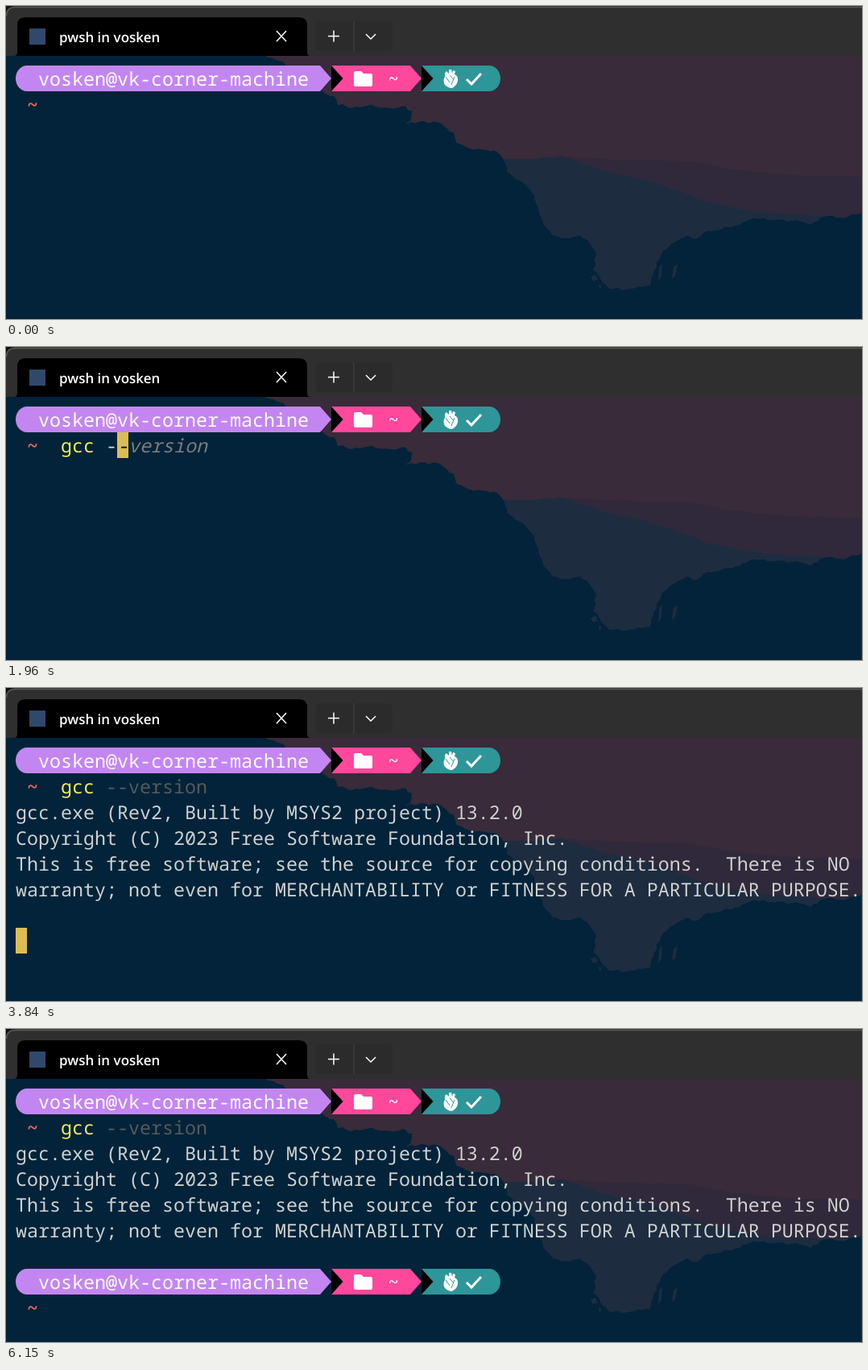
Animation of 1063 by 389 pixels, one loop 6.3 s. Source, as an HTML page:

```html
<!DOCTYPE html>
<html lang="en">
<head>
<meta charset="utf-8">
<title>Terminal</title>
<style>
  html, body { margin: 0; width: 100%; height: 100%; overflow: hidden; background: #02233a; }
  svg { display: block; width: 1063px; height: 389px; }
  text {
    font: 23.3333px "Noto Sans Mono", "DejaVu Sans Mono", monospace;
    white-space: pre;
    text-rendering: geometricPrecision;
    font-variant-ligatures: none;
  }
  .title { font: 600 17px "Open Sans", "Noto Sans", sans-serif; fill: #fff; }
  .line { fill: none; stroke: #fff; stroke-width: 1.5; }
  .out { fill: #cdd1cd; }
  .ghost { font-style: italic; fill: #7b7d7a; }
  .under { font-style: italic; fill: #14181c; }
  .cmd { fill: #f5ec4c; }
  .tilde { fill: #ec6a61; font-weight: 600; }
</style>
</head>
<body>
<svg viewBox="0 0 1063 389" xmlns="http://www.w3.org/2000/svg">
  <defs>
    <g id="prompt">
      <path fill="#c386f1" d="M26 74H390L404 90L390 106H26A14 16 0 0 1 26 74Z"/>
      <path fill="#ff479c" d="M404 74H502L516 90L502 106H404Z"/>
      <path fill="#2e9599" d="M516 74H600A14 16 0 0 1 600 106H516Z"/>
      <path d="M404 74L418.500 90L404 106ZM516 74L530.500 90L516 106Z"/>
      <g fill="#fff">
        <text x="40" y="99">vosken@vk-corner-machine</text>
        <text x="474" y="99" font-weight="600">~</text>
        <path d="M434 81H441L444 84H453Q455 84 455 86V98Q455 100 453 100H434Q432 100 432 98V83Q432 81 434 81Z"/>
        <path d="M545 88Q542 93 545 98Q549 102 554 102Q560 99 561 93Q562 87 557 85L558 81L555 80L554 84L553 79L550 79L550 84L547 81L545 83Z"/>
      </g>
      <path d="M546 88L551 95M551 86L556 92M557 88L553 98" fill="none" stroke="#2e9599"/>
      <path d="M572 91L578 97L590 84" fill="none" stroke="#fff" stroke-width="3"/>
      <text class="tilde" x="26" y="131">~</text>
    </g>
  </defs>

  <rect width="1063" height="389" fill="#02233a"/>
  <g id="scene"></g>

  <rect width="1063" height="62" fill="#2f2f2f"/>
  <path d="M0 0H12Q0 0 0 12Z" fill="#111"/>
  <path d="M.5 12Q.5 1.500 12 1.500H1063" fill="none" stroke="#575757" stroke-width="1.500"/>
  <path d="M10 62Q14 62 14 57V24Q14 14 24 14H364Q374 14 374 24V57Q374 62 378 62Z"/>
  <rect x="384" y="19" width="96" height="37" rx="6" fill="#2b2b2b"/>
  <path d="M432 19V56" stroke="#464646"/>
  <rect x="29" y="28" width="20" height="20" fill="#30486b"/>
  <text class="title" x="66" y="45">pwsh in vosken</text>
  <path class="line" d="M336 31L348 44M348 31L336 44M400 37.500H414M407 30.500V44.500M447 35L453 41L459 35"/>

  <use href="#prompt"/>
  <rect id="cursor" width="14" height="32" fill="#dcbd55"/>
  <text id="cmd" class="cmd" x="68" y="131"></text>
  <text id="opt" x="124" y="131"></text>
  <text id="under" class="under" y="131"></text>
  <text id="ghost" class="ghost" y="131"></text>
  <g id="output" class="out"></g>
  <use id="next" href="#prompt" y="224"/>
</svg>
<script>
const $ = id => document.getElementById(id);
const NS = "http://www.w3.org/2000/svg";
const CELL = 14, ROW = 32, LEFT = 12, TOP = 74, START = 68;
const LOOP = 6300, RUN = 3840, READY = 3900;

function add(parent, tag, attrs, text = "") {
  const el = document.createElementNS(NS, tag);
  for (const key in attrs) el.setAttribute(key, attrs[key]);
  el.textContent = text;
  parent.append(el);
}

// Landscape: a few ridge points, roughened by seeded noise
let seed = 7;
const noise = () => (seed = seed * 16807 % 2147483647) / 2147483647 - 0.5;

function ridge(points, rough) {
  const p = points.split(" ").map(s => s.split(",").map(Number));
  let d = "M" + p[0];
  for (let i = 1; i < p.length; i++) {
    const [ax, ay] = p[i - 1], [bx, by] = p[i];
    const n = Math.max(1, Math.round(Math.hypot(bx - ax, by - ay) / 5));
    for (let k = 1; k <= n; k++) {
      const x = ax + (bx - ax) * k / n + noise() * rough;
      const y = ay + (by - ay) * k / n + noise() * rough;
      d += `L${x.toFixed(1)} ${y.toFixed(1)}`;
    }
  }
  return d;
}

const layers = [
  ["#392b39", "M322 62H1063V300H620Z", 0],
  ["#30293b", "690,187 760,191 850,193 900,203 970,210 1063,212", 1, "V300H700Z"],
  ["#1e2c40", "612,190 650,190 690,187 720,197 750,207 790,215 830,228 870,243 910,252 960,258 1030,262 1063,262", 1, "V389H612Z"],
  ["#02233a", "322,62 340,68 354,78 372,90 393,107 406,113 413,122 430,127 455,124 475,127 492,124 504,131 " +
    "503,142 494,146 520,144 540,146 555,158 560,169 575,176 596,180 609,180 618,190 623,206 632,214 645,222 " +
    "655,235 662,255 668,273 680,285 700,290 712,284 725,295 732,310 730,328 737,338 748,351 775,352 799,347 " +
    "804,334 809,319 817,305 830,292 845,285 859,290 870,280 900,275 930,264 965,266 985,268 1000,272 1015,262 1040,263 1063,258",
    3, "V389H322Z"]
];
for (const [fill, shape, rough, close] of layers)
  add($("scene"), "path", { fill, d: close ? ridge(shape, rough) + close : shape });
add($("scene"), "path", {
  d: "M811 325L815 320L814 336L810 342ZM829 324L834 321L831 336L827 339ZM726 337L732 334L735 340L729 342ZM736 346L740 348L737 353Z",
  fill: "#1e2c40"
});
add($("scene"), "path", { d: "M474 150L488 139L501 136L502 143L489 149L484 154Z", fill: "#02233a" });

[
  "gcc.exe (Rev2, Built by MSYS2 project) 13.2.0",
  "Copyright (C) 2023 Free Software Foundation, Inc.",
  "This is free software; see the source for copying conditions.  There is NO",
  "warranty; not even for MERCHANTABILITY or FITNESS FOR A PARTICULAR PURPOSE."
].forEach((line, i) => add($("output"), "text", { x: LEFT, y: TOP + ROW * (i + 2) + 25 }, line));

const command = "gcc --version";
const keys = [850, 1080, 1270, 1650, 1960, 2150, 2450, 2630, 2710, 2960, 3100, 3240, 3280];
const blinks = [330, 4400, 4980, 5500, 6100, 6150];

const show = (id, on) => $(id).setAttribute("visibility", on ? "visible" : "hidden");
const place = (id, x, y) => {
  $(id).setAttribute("x", x);
  if (y !== undefined) $(id).setAttribute("y", y);
};

function draw(t) {
  const n = keys.filter(k => k <= t).length;
  const typing = n > 0 && t < RUN;
  const x = START + n * CELL;

  $("cmd").textContent = command.slice(0, Math.min(n, 3));
  $("opt").textContent = command.slice(4, Math.max(n, 4));
  $("opt").setAttribute("fill", n === 5 ? "#cdd1cd" : "#555a59");
  $("under").textContent = typing ? command.slice(n, n + 1) : "";
  $("ghost").textContent = typing ? command.slice(n + 1) : "";
  place("under", x);
  place("ghost", x + CELL);

  show("output", t >= RUN);
  show("next", t >= READY);
  show("cursor", blinks.filter(b => b <= t).length % 2 === 1);
  if (t < RUN) place("cursor", x, TOP + ROW);
  else if (t < READY) place("cursor", LEFT, TOP + 7 * ROW);
  else place("cursor", START, TOP + 8 * ROW);
}

const begin = performance.now();
function tick() {
  draw((performance.now() - begin) % LOOP);
  requestAnimationFrame(tick);
}
tick();
</script>
</body>
</html>
```
